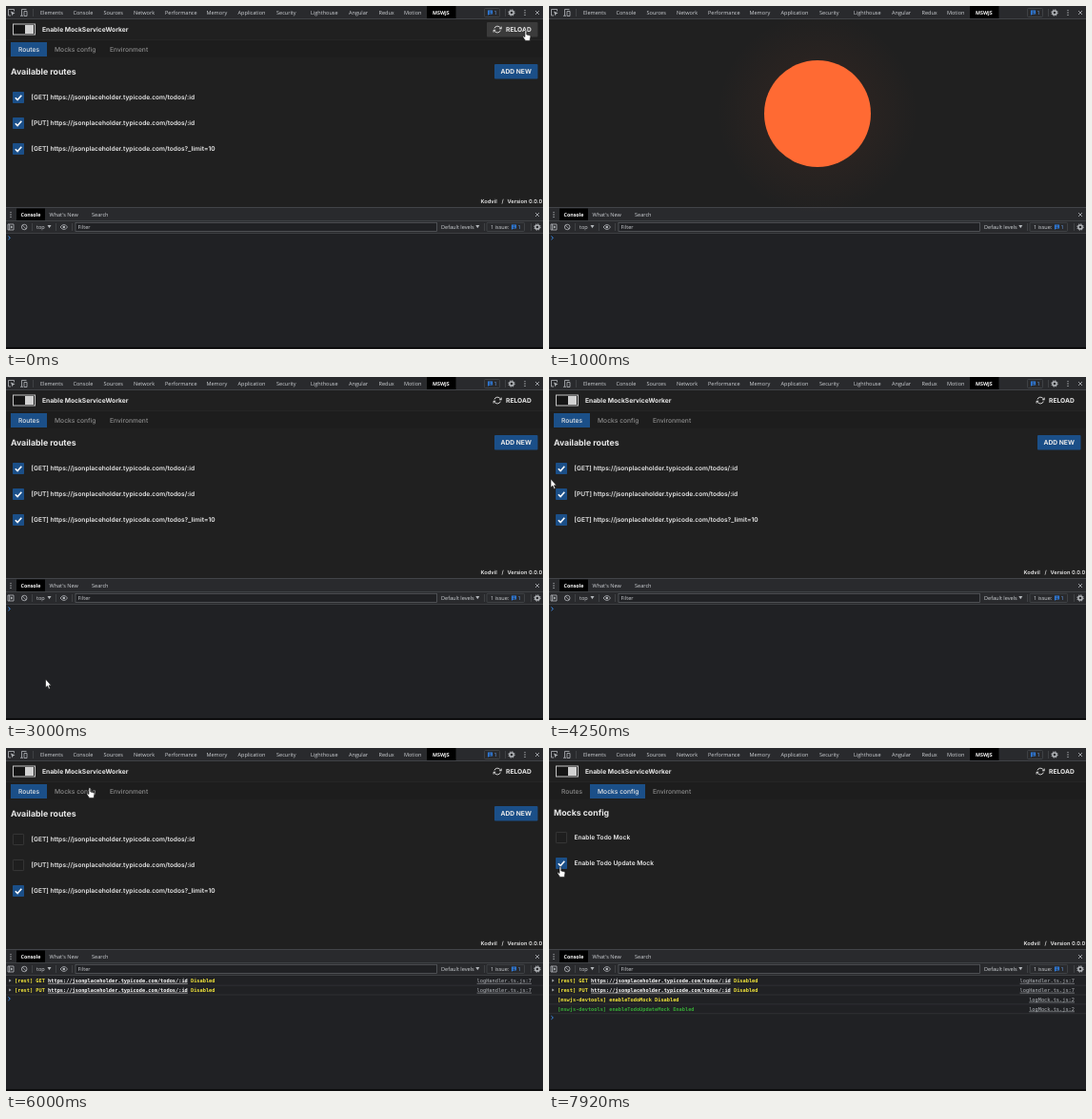
These frames come from a looping animation (564 px wide and 360 px high, 8000 ms). An HTML page:

```html
<!DOCTYPE html>
<html lang="en">
<head>
<meta charset="utf-8">
<title>Mock devtools panel</title>
<style>
html, body { margin: 0; width: 100%; height: 100%; overflow: hidden; background: #202124; }
svg { display: block; width: 564px; height: 360px; }
text { text-rendering: geometricPrecision; fill: #e9e9e9; }
.dev { font: 5.55px "Open Sans", sans-serif; fill: #cfd2d6; }
.on { font-weight: 700; fill: #fff; font-size: 5.3px; }
.ui { font: 500 6.7px Inter, sans-serif; }
.label { font: 600 6.62px Inter, sans-serif; }
.bold { font-weight: 700; }
.dim { fill: #8c8c8c; }
.head { font: 700 8.75px Inter, sans-serif; }
.foot { font: 600 5.7px Inter, sans-serif; }
.log { font: 700 5.31px "DejaVu Sans Mono", monospace; }
.src { font: 5.31px "DejaVu Sans Mono", monospace; fill: #b4b8bd; text-decoration: underline; text-anchor: end; }
.url { fill: #fff; text-decoration: underline; }
.line { fill: none; stroke: #b4b7bb; stroke-width: .8; }
</style>
</head>
<body>
<svg id="stage" viewBox="0 0 564 360">
  <defs>
    <radialGradient id="glow">
      <stop offset="0" stop-color="#ff6a33" stop-opacity=".06"/>
      <stop offset=".55" stop-color="#ff6a33" stop-opacity=".04"/>
      <stop offset="1" stop-color="#ff6a33" stop-opacity="0"/>
    </radialGradient>
  </defs>
  <g id="frame"></g>
  <g id="live"></g>
</svg>
<script>
const LOOP = 8000, FPS = 12;
const BLUE = '#1b4f88', PAGE = '#202020', BAR = '#292a2d', EDGE = '#494c50';

const rect = (x, y, w, h, fill, more = '') =>
  `<rect x="${x}" y="${y}" width="${w}" height="${h}" fill="${fill}" ${more}/>`;
const text = (x, y, s, cls) => `<text x="${x}" y="${y}" class="${cls}">${s}</text>`;
const line = (d, more = '') => `<path class="line" d="${d}" ${more}/>`;
const scaled = (cx, cy, s, body) =>
  `<g transform="translate(${cx} ${cy}) scale(${s}) translate(${-cx} ${-cy})">${body}</g>`;

// ---- browser tools around the page ----
const divider = (x, y) => rect(x, y - 4, .7, 8, EDGE);
const gear = (x, y) => `<circle class="line" cx="${x}" cy="${y}" r="2.1" style="stroke-width:1.5"/>
  <circle class="line" cx="${x}" cy="${y}" r="3.2" style="stroke-width:1" stroke-dasharray="1.25 1.26"/>`;
const cross = (x, y) => line(`M${x - 2} ${y - 2}l4 4m0-4l-4 4`);
const dots = (x, y) => [-2.4, 0, 2.4].map(d => `<circle cx="${x}" cy="${y + d}" r=".7" fill="#b4b7bb"/>`).join('');
const caret = (x, y) => `<path d="M${x} ${y}h4l-2 3.2z" fill="#b4b7bb"/>`;
const issue = (x, y) => `<path d="M${x} ${y - 2.5}h5v4h-3l-2 1.3z" fill="#2f7de0"/>`
  + rect(x + 1.2, y - 1.4, 2.6, .7, BAR) + rect(x + 1.2, y, 2.6, .6, BAR)
  + `<text x="${x + 6.6}" y="${y + 2}" class="dev" style="fill:#6aa5f5">1</text>`;

function tools() {
  const tabs = [['Elements', 36], ['Console', 70.5], ['Sources', 102.5], ['Network', 134],
    ['Performance', 167], ['Memory', 210.5], ['Application', 243.5], ['Security', 284],
    ['Lighthouse', 320], ['Angular', 360], ['Redux', 391.5], ['Motion', 418]];
  return rect(0, 0, 564, 13, BAR) + rect(0, 13, 564, .8, EDGE)
    + line('M8.5 5.5V3.5H2.5V10H5') + '<path d="M5 5.5l4.5 2-2 .7-.8 2z" fill="#b4b7bb"/>'
    + line('M16.5 10V3.5H21.5M15 10.3h3M19 5.5h3v5h-3z') + divider(28, 7)
    + tabs.map(([s, x]) => text(x, 9, s, 'dev')).join('')
    + rect(442, 0, 30.5, 13, '#000') + text(448, 9, 'MSWJS', 'dev on')
    + rect(502.5, 2.5, 16, 9, 'none', `stroke="${EDGE}" stroke-width=".7" rx="1"`) + issue(506, 7)
    + divider(524, 7) + gear(531, 7) + dots(545, 7) + cross(558, 7)
    // console drawer
    + rect(0, 211, 564, 27, BAR) + rect(0, 211, 564, .8, EDGE) + rect(0, 225, 564, .7, EDGE)
    + dots(5, 219) + rect(11, 212.5, 30, 12.5, '#000') + text(15.5, 221, 'Console', 'dev on')
    + text(45.5, 221, "What's New", 'dev') + text(90, 221, 'Search', 'dev') + cross(558, 219)
    + rect(0, 238, 564, 122, '#202124') + rect(0, 238, 564, .7, EDGE)
    + line('M2 229h6v6h-6zM3.6 229v6') + '<path d="M4.8 230.3l2.4 1.7-2.4 1.7z" fill="#b4b7bb"/>'
    + line('M16.4 232a2.8 2.8 0 1 0 5.6 0a2.8 2.8 0 1 0-5.6 0M17.2 230l4 4') + divider(27, 232)
    + text(32, 234, 'top', 'dev') + caret(43.5, 230) + divider(52, 232)
    + line('M57 232q3.8-5 7.6 0q-3.8 5-7.6 0z') + '<circle cx="60.8" cy="232" r="1.3" fill="#b4b7bb"/>'
    + divider(69, 232) + rect(73, 227.3, 379.5, 9.2, '#202124', 'stroke="#606367" stroke-width=".7"')
    + text(75.5, 234, 'Filter', 'dev') + text(457, 234, 'Default levels', 'dev') + caret(493.3, 230)
    + divider(502, 232) + rect(505, 227.3, 39.5, 9.2, 'none', `stroke="${EDGE}" stroke-width=".7" rx="1"`)
    + text(509, 234, '1 issue:', 'dev') + issue(531, 232) + divider(551, 232) + gear(558, 232)
    + rect(0, 358, 564, 2, '#0c0c0d');
}

// ---- the panel ----
function checkbox(cy, label, checked, s = 1) {
  const box = checked
    ? rect(7, cy - 6, 12, 12, BLUE, 'rx=".8"')
      + `<path d="M9.8 ${cy + .2 + (1 - s) * 25}l2.3 2.3 4.2-4.7" fill="none" stroke="#fff" stroke-width="1.6"/>`
    : rect(7.4, cy - 5.6, 11.2, 11.2, '#1e1e1e', 'rx=".8" stroke="#3e3e3e" stroke-width=".8"');
  return scaled(13, cy, s, box) + text(26.5, cy + 2.3, label, 'label');
}

function panel(now) {
  const mocks = now >= EVENT.tab;
  const s = now >= EVENT.loaded ? Math.min(1, .9 + (now - EVENT.loaded) / 5830) : 1;
  const tab = (x, label, on) => text(x, 47.8, label, on ? 'ui' : 'ui dim');
  const reload = `<path transform="translate(511.7 20.1) scale(.37)" fill="none" stroke="#e9e9e9" stroke-width="2.4"
    d="M23 4v6h-6M1 20v-6h6M3.5 9a9 9 0 0 1 14.9-3.4L23 10M1 14l4.6 4.4A9 9 0 0 0 20.5 15"/>`
    + text(525, 27, 'RELOAD', 'ui bold');
  const host = 'https://jsonplaceholder.typicode.com/todos';
  const body = mocks
    ? text(5, 70.6, 'Mocks config', 'head')
      + checkbox(94, 'Enable Todo Mock', now < EVENT.mockOff)
      + checkbox(121, 'Enable Todo Update Mock', now >= EVENT.updateOn)
    : text(5, 71.6, 'Available routes', 'head')
      + scaled(535.7, 68.7, s, rect(513, 61, 45.5, 15.5, BLUE, 'rx="1"') + text(519.5, 71.2, 'ADD NEW', 'ui bold'))
      + checkbox(96, `[GET] ${host}/:id`, now < EVENT.getOff, s)
      + checkbox(123, `[PUT] ${host}/:id`, now < EVENT.putOff, s)
      + checkbox(150, `[GET] ${host}?_limit=10`, true, s);
  return rect(0, 35.5, 564, .7, '#2b2b2b') + rect(0, 36, 564, 17.5, '#1d1d1d')
    + rect(7.5, 19, 23, 11, '#151515', 'stroke="#c4c4c4" stroke-width="1"')
    + rect(20, 20, 9, 9, '#d2d2d2')
    + text(38, 27, 'Enable MockServiceWorker', 'ui bold')
    + (now < EVENT.loading ? rect(505, 17, 53.5, 15.5, '#3b3b3b', 'rx="1"') : '')
    + scaled(532, 24.5, s, reload)
    + (mocks ? rect(43, 38, 58, 15, BLUE) : rect(5, 38, 38, 15, BLUE))
    + tab(13, 'Routes', !mocks) + tab(51, 'Mocks config', mocks) + tab(109, 'Environment', false)
    + body
    + text(498.5, 207.2, 'Kodvil', 'foot') + text(520.5, 207.2, '/', 'foot') + text(526.5, 207.2, 'Version 0.0.0', 'foot');
}

function loader(now) {
  const grow = Math.min(1, (now - EVENT.loading) / 420);
  return `<circle cx="282" cy="113" r="${60 + 46 * grow}" fill="url(#glow)"/>
    <circle cx="282" cy="113" r="56" fill="#ff6a33"/>`;
}

// ---- console output ----
const EVENT = { loading: 583, loaded: 1416, getOff: 4583, putOff: 5250, tab: 6333, mockOff: 7083, updateOn: 7833 };
const route = verb => `[rest] ${verb} <tspan class="url">https://jsonplaceholder.typicode.com/todos/:id</tspan> Disabled`;
const LOGS = [
  [EVENT.getOff, route('GET'), 'logHandler.ts.js:7', '#f2e53a'],
  [EVENT.putOff, route('PUT'), 'logHandler.ts.js:7', '#f2e53a'],
  [EVENT.mockOff, '[mswjs-devtools] enableTodoMock Disabled', 'logMock.ts.js:2', '#f2e53a'],
  [EVENT.updateOn, '[mswjs-devtools] enableTodoUpdateMock Enabled', 'logMock.ts.js:2', '#36a836'],
];

function output(now) {
  const rows = LOGS.filter(([at]) => now >= at);
  const y = 243.4 + 9.9 * rows.length;
  return rows.map(([, msg, src, color], i) => {
    const cy = 244.1 + 9.9 * i;
    return (i < 2 ? `<path d="M3.2 ${cy - 1.6}l2.4 1.6-2.4 1.6z" fill="#a0a3a7"/>` : '')
      + `<text x="9" y="${cy + 1.8}" class="log" style="fill:${color}">${msg}</text>`
      + text(552, cy + 1.8, src, 'src') + rect(0, cy + 4.7, 564, .6, '#38393c');
  }).join('') + `<path d="M2.4 ${y - 1.8}l2 1.8-2 1.8" fill="none" stroke="#3b8ae6" stroke-width="1"/>`;
}

// ---- pointer: time, x, y, shape ----
const TRACK = [
  [0, 546, 26, 'hand'], [583, 0, 0, ''],
  [1916, 554, 63, 'hand'], [2999, 554, 63, 'hand'],
  [3000, 41.5, 317, 'arrow'], [3082, 41.5, 317, 'arrow'],
  [3083, 9, 100, 'arrow'], [3334, 9, 100, 'arrow'], [3833, 0, 109, 'arrow'],
  [4167, 0, 109, 'arrow'], [4500, 12, 96, 'hand'], [4667, 12, 96, 'hand'],
  [5000, 13.5, 126, 'hand'], [5250, 13.5, 126, 'hand'], [5583, 13.5, 146, 'hand'],
  [5667, 13.5, 146, 'hand'], [6000, 88, 42, 'hand'], [6333, 88, 42, 'hand'],
  [6833, 18.5, 95, 'hand'], [7083, 14, 93, 'hand'], [7167, 14, 93, 'hand'],
  [7500, 12, 125, 'hand'], [LOOP, 12, 125, 'hand'],
];
const SHAPES = {
  arrow: 'M0 0V9L2 7.2 3.5 10.4 4.9 9.8 3.5 6.8H6Z',
  hand: 'M-1 .6a.9 .9 0 0 1 1.8 0V4l3.4 .8q.9 .3 .7 1.4L4.2 10.4H-.4L-3 6.8q-.2-1.1 .7-1.2L-1 6.6Z',
};

function pointer(now) {
  const i = TRACK.findIndex(([at]) => at > now + .5) - 1;
  const [t0, x0, y0, shape] = TRACK[i], [t1, x1, y1, next] = TRACK[i + 1];
  if (!shape) return '';
  const k = (now - t0) / (t1 - t0), e = next ? Math.max(0, k * k * (3 - 2 * k)) : 0;
  return `<path transform="translate(${x0 + (x1 - x0) * e} ${y0 + (y1 - y0) * e})" d="${SHAPES[shape]}"
    fill="#fff" stroke="#111" stroke-width=".6"/>`;
}

const live = document.getElementById('live');
document.getElementById('frame').innerHTML = rect(0, 0, 564, 360, PAGE) + tools();

let shown = -1;
function draw(time) {
  const step = Math.floor((time % LOOP + 5) * FPS / 1000) % (LOOP * FPS / 1000);
  if (step !== shown) {
    shown = step;
    const now = step * 1000 / FPS;
    const busy = now >= EVENT.loading && now < EVENT.loaded;
    live.innerHTML = (busy ? loader(now) : panel(now)) + output(now) + pointer(now);
  }
}

const start = performance.now();
function tick() {
  draw(performance.now() - start);
  requestAnimationFrame(tick);
}
tick();
</script>
</body>
</html>
```
